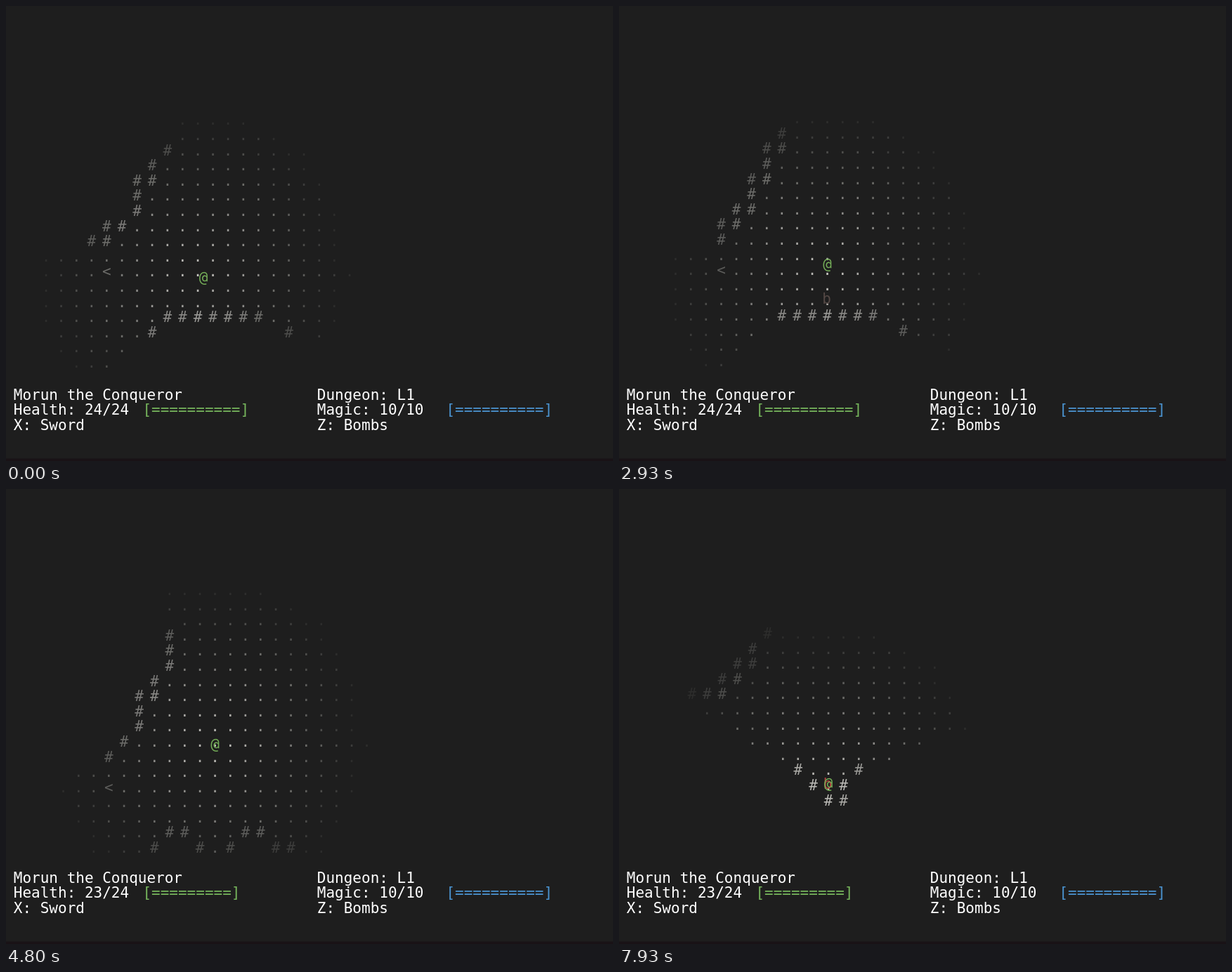
An HTML page for the animation above (8 s loop, 864 by 648 pixels).

```html
<!DOCTYPE html>
<html lang="en">
<head>
<meta charset="utf-8">
<title>Dungeon</title>
<style>
  html, body { margin: 0; width: 100%; height: 100%; overflow: hidden; background: #1e1e1e; }
  svg { display: block; width: 100vw; height: 100vh; }
  text { font: 21px "DejaVu Sans Mono", monospace; white-space: pre; }
  #map text { text-anchor: middle; }
  #hud { fill: #fff; }
  #hud .hp { fill: #76b55c; }
  #hud .mp { fill: #4b94d1; }
</style>
</head>
<body>
<svg viewBox="0 0 864 648">
  <defs><clipPath id="view"><rect width="864" height="518.4"/></clipPath></defs>
  <rect width="864" height="648" fill="#1e1e1e"/>
  <rect y="644.5" width="864" height="3.5" fill="#191216"/>
  <g clip-path="url(#view)"><g id="map"><g id="cells"></g></g></g>
  <g id="hud">
    <text x="10.8" y="561">Morun the Conqueror</text>
    <text id="health" x="10.8" y="582"></text>
    <text id="bar" class="hp" x="194.4" y="582"></text>
    <text x="10.8" y="604">X: Sword</text>
    <text x="442.8" y="561">Dungeon: L1</text>
    <text x="442.8" y="582">Magic: 10/10</text>
    <text class="mp" x="626.4" y="582">[==========]</text>
    <text x="442.8" y="604">Z: Bombs</text>
  </g>
</svg>
<script>
const LOOP = 8000, HOLD = 270, TICK = 200 / 3;
const CELL = 21.6, RAYS = 80, REACH = 10;
const TURN = 1250, DROP = 2130, BLAST = 4100, REDROP = 7870;
const $ = id => document.getElementById(id);

// World cells are counted from the stairs at (0, 0).
// Walks along a column: start time, row to reach, time per row
const walks = [
  [1550, 2, 327], [2250, -2, 330], [4634, -3, 200],
  [4900, 2, 210], [6000, 3, 200], [7685, 4, 200]
];

function goalRow(t) {
  let row = 0;
  for (const [start, end, pace] of walks) {
    if (t < start) break;
    const done = Math.min(Math.abs(end - row), 1 + Math.floor((t - start) / pace));
    row += Math.sign(end - row) * done;
  }
  return row;
}

// The player eases to its goal cell and the camera drifts after the player.
function simulate() {
  let x = 6.37, y = 0.42, ox = 143.4, oy = 379;
  const states = [{ t: 0, x, y, ox, oy }];
  for (let t = HOLD; t <= LOOP; t += TICK) {
    ox += (121.8 + 3.6 * x - ox) * 0.035;
    oy += (392 - CELL * y - oy) * 0.064;
    x += ((t < TURN ? 6 : 7) - x) * 0.43;
    y += (goalRow(t) - y) * 0.43;
    states.push({ t, x, y, ox, oy });
  }
  return states;
}

function isWall(x, y, blown) {
  if (y > 2) {
    const crater = blown && Math.abs(x - 7) + Math.abs(y - 3) <= 1;
    return !crater && x >= 7 - y && x <= 2 * y + 4;
  }
  if (y > -2 || y === -2 && x < -2) return false;
  return x <= Math.floor(4.4 - (y + 9.5) ** 2 / 13);
}

// Cast rays in unit steps; each lit cell keeps its shortest distance.
function look(cx, cy, blown) {
  const lit = new Map();
  for (let i = 0; i < RAYS; i++) {
    const a = i / RAYS * 2 * Math.PI, dx = Math.cos(a), dy = Math.sin(a);
    for (let d = 0; d <= REACH; d++) {
      const x = Math.floor(cx + dx * d), y = Math.floor(cy + dy * d);
      const key = x + "," + y, wall = isWall(x, y, blown);
      if (!lit.has(key) || lit.get(key).d > d) lit.set(key, { x, y, d, wall });
      if (wall) break;
    }
  }
  return lit.values();
}

function glyph(parent, char, fill) {
  const el = document.createElementNS("http://www.w3.org/2000/svg", "text");
  el.textContent = char;
  el.setAttribute("fill", fill);
  parent.appendChild(el);
  return el;
}

function place(el, x, y) {
  el.setAttribute("x", x * CELL);
  el.setAttribute("y", y * CELL + 6.3);
}

const states = simulate(), pool = [];
const bomb = glyph($("map"), "b", "none");
const hero = glyph($("map"), "@", "#74ad58");
let scene = "";

function drawCells(cx, cy, blown) {
  const id = [cx, cy, blown].join();
  if (id === scene) return;
  scene = id;
  let n = 0;
  for (const { x, y, d, wall } of look(cx, cy, blown)) {
    const el = pool[n] || (pool[n] = glyph($("cells"), "", "#c8c7c2"));
    el.textContent = wall ? "#" : x || y ? "." : "<";
    el.setAttribute("fill-opacity", 1 - d / (REACH + 1));
    el.style.display = "";
    place(el, x, y);
    n++;
  }
  for (; n < pool.length; n++) pool[n].style.display = "none";
}

// A fresh bomb glows red, then cools to grey.
function drawBomb(t) {
  const again = t >= REDROP - TICK / 2;
  const heat = Math.max(0, 1 - (t - (again ? REDROP : DROP)) / 900);
  bomb.style.display = again || t >= DROP && t < BLAST ? "" : "none";
  bomb.setAttribute("fill", `rgb(${72 + 120 * heat},${72 - 4 * heat},${70 - 6 * heat})`);
  place(bomb, 6.95, again ? 3.9 : 1.9);
}

function draw(time) {
  // Ticks land on whole hundredths of a second, rounded down.
  const n = time < HOLD ? 0 : 1 + Math.floor((time - HOLD + 7) / TICK);
  const { t, x, y, ox, oy } = states[Math.min(n, states.length - 1)];
  const blown = t >= BLAST;

  $("map").setAttribute("transform", `translate(${ox} ${oy})`);
  drawCells(Math.round(x), Math.round(y), blown);
  drawBomb(t);
  place(hero, x, y);
  $("health").textContent = `Health: ${blown ? 23 : 24}/24`;
  $("bar").textContent = `[${"=".repeat(blown ? 9 : 10)}]`;
}

const start = performance.now();
function loop() {
  draw((performance.now() - start) % LOOP);
  requestAnimationFrame(loop);
}
loop();
</script>
</body>
</html>
```
